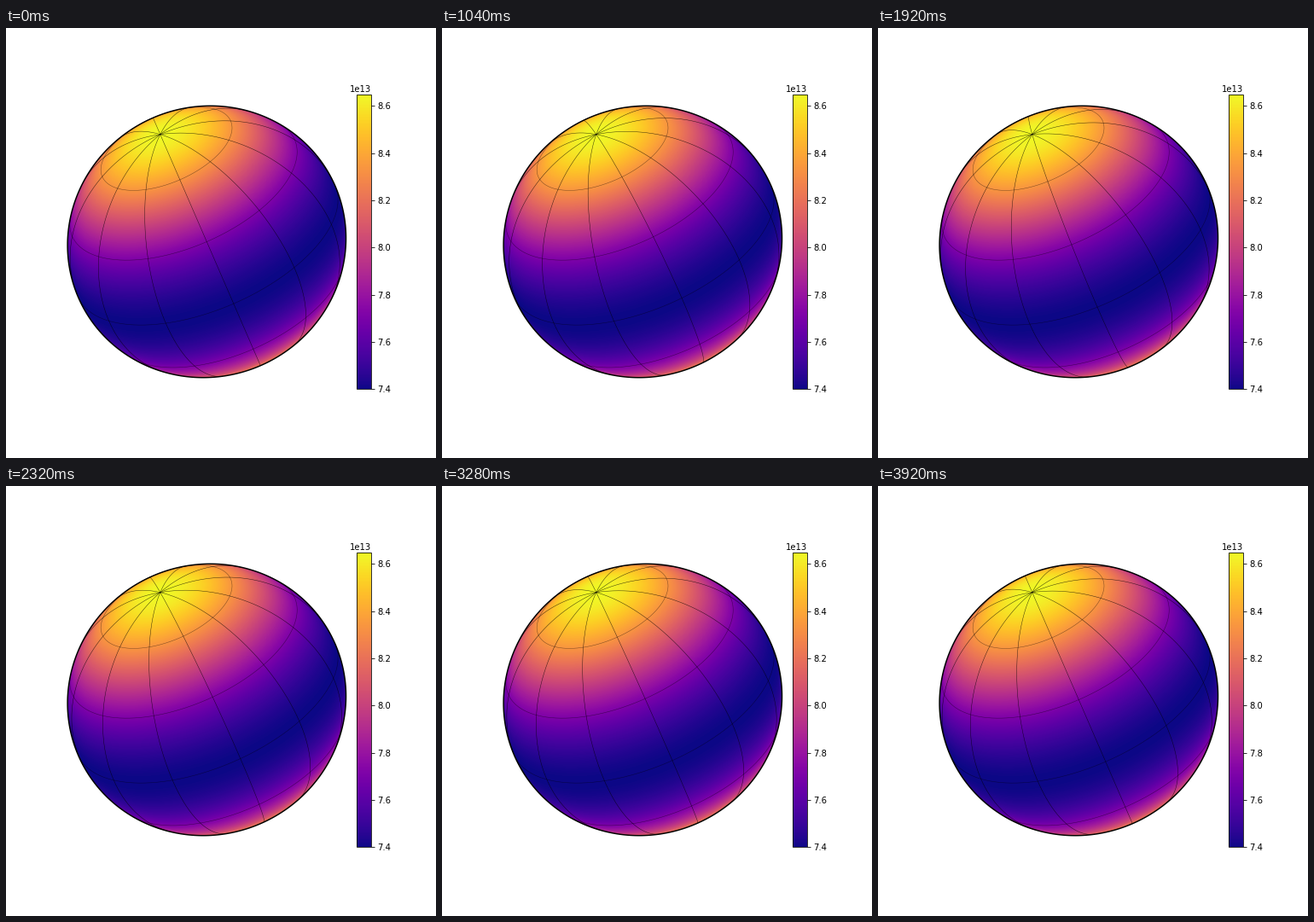
Recreate the animation shown at these times as a matplotlib script. Size 504 by 504 pixels, loop 4000 ms.

```python
import numpy as np
import matplotlib.pyplot as plt
from matplotlib.animation import FuncAnimation
from matplotlib.patches import Polygon

SIZE, DPI = 504, 72
FRAMES, INTERVAL = 50, 80
CENTER = (235.3, 250.5)
MAJOR, MINOR = 164.1, 158.3        # projected semi-axes in pixels
TILT = np.radians(30)              # pole leaning toward the viewer
OBL = np.radians(23.44)            # pole leaning to the left
I_EQ, I_POLE = 7.3995e13, 8.648e13

plt.rcParams["font.family"] = "DejaVu Sans"
plt.rcParams["font.size"] = 10


def to_screen(x, y):
    """Unit-disc coordinates (y along the projected pole) to pixels."""
    x, y = x * MAJOR, y * MINOR
    return (CENTER[0] + x * np.cos(OBL) - y * np.sin(OBL),
            CENTER[1] - x * np.sin(OBL) - y * np.cos(OBL))


def project(lat, lon):
    """Screen path of surface points, with the far side left out."""
    x = np.cos(lat) * np.sin(lon)
    y = np.sin(lat) + 0 * lon
    z = np.cos(lat) * np.cos(lon)
    depth = y * np.sin(TILT) + z * np.cos(TILT)
    px, py = to_screen(x, y * np.cos(TILT) - z * np.sin(TILT))
    hidden = depth < 0
    return np.where(hidden, np.nan, px), np.where(hidden, np.nan, py)


def intensity():
    """Gravity-darkened brightness, growing from equator to pole."""
    px, py = np.meshgrid(np.arange(SIZE) + 0.5, np.arange(SIZE) + 0.5)
    dx, dy = px - CENTER[0], CENTER[1] - py
    x = (dx * np.cos(OBL) + dy * np.sin(OBL)) / MAJOR
    y = (dy * np.cos(OBL) - dx * np.sin(OBL)) / MINOR
    z = np.sqrt(np.clip(1 - x**2 - y**2, 0, None))
    sin_lat = y * np.cos(TILT) + z * np.sin(TILT)
    return I_EQ + (I_POLE - I_EQ) * np.clip(sin_lat**2, 0, 1)


fig = plt.figure(figsize=(SIZE / DPI, SIZE / DPI), dpi=DPI, facecolor="white")
ax = fig.add_axes([0, 0, 1, 1])
ax.set_axis_off()

img = ax.imshow(intensity(), cmap="plasma", vmin=I_EQ, vmax=I_POLE,
                extent=(0, SIZE, SIZE, 0), aspect="auto")
ax.set(xlim=(0, SIZE), ylim=(SIZE, 0))

turn = np.linspace(0, 2 * np.pi, 500)
limb = np.column_stack(to_screen(np.cos(turn), np.sin(turn)))
border = Polygon(limb, closed=True, fill=False, ec="black", lw=1.5, zorder=5)
ax.add_patch(border)
img.set_clip_path(Polygon(limb, closed=True, transform=ax.transData))

for lat in np.radians([-60, -30, 0, 30, 60]):
    # start each circle at the back so the visible arc stays in one piece
    ax.plot(*project(lat, turn - np.pi), "k-", lw=0.5, alpha=0.5, zorder=4)

lats = np.linspace(-np.pi / 2, np.pi / 2, 400)
lons = np.radians(np.arange(0, 360, 30))
meridians = [ax.plot([], [], "k-", lw=0.5, alpha=0.75, zorder=4)[0]
             for _ in lons]

left, right, top, bottom = 411, 428.3, 78.2, 423.4
cax = fig.add_axes([left / SIZE, 1 - bottom / SIZE,
                    (right - left) / SIZE, (bottom - top) / SIZE])
fig.colorbar(img, cax=cax)


def update(frame):
    spin = 2 * np.pi * frame / (FRAMES - 1)
    for line, lon in zip(meridians, lons):
        line.set_data(*project(lats, lon + spin))
    return meridians


anim = FuncAnimation(fig, update, frames=FRAMES, interval=INTERVAL,
                     repeat=True, repeat_delay=0, blit=False)
plt.show()
```
